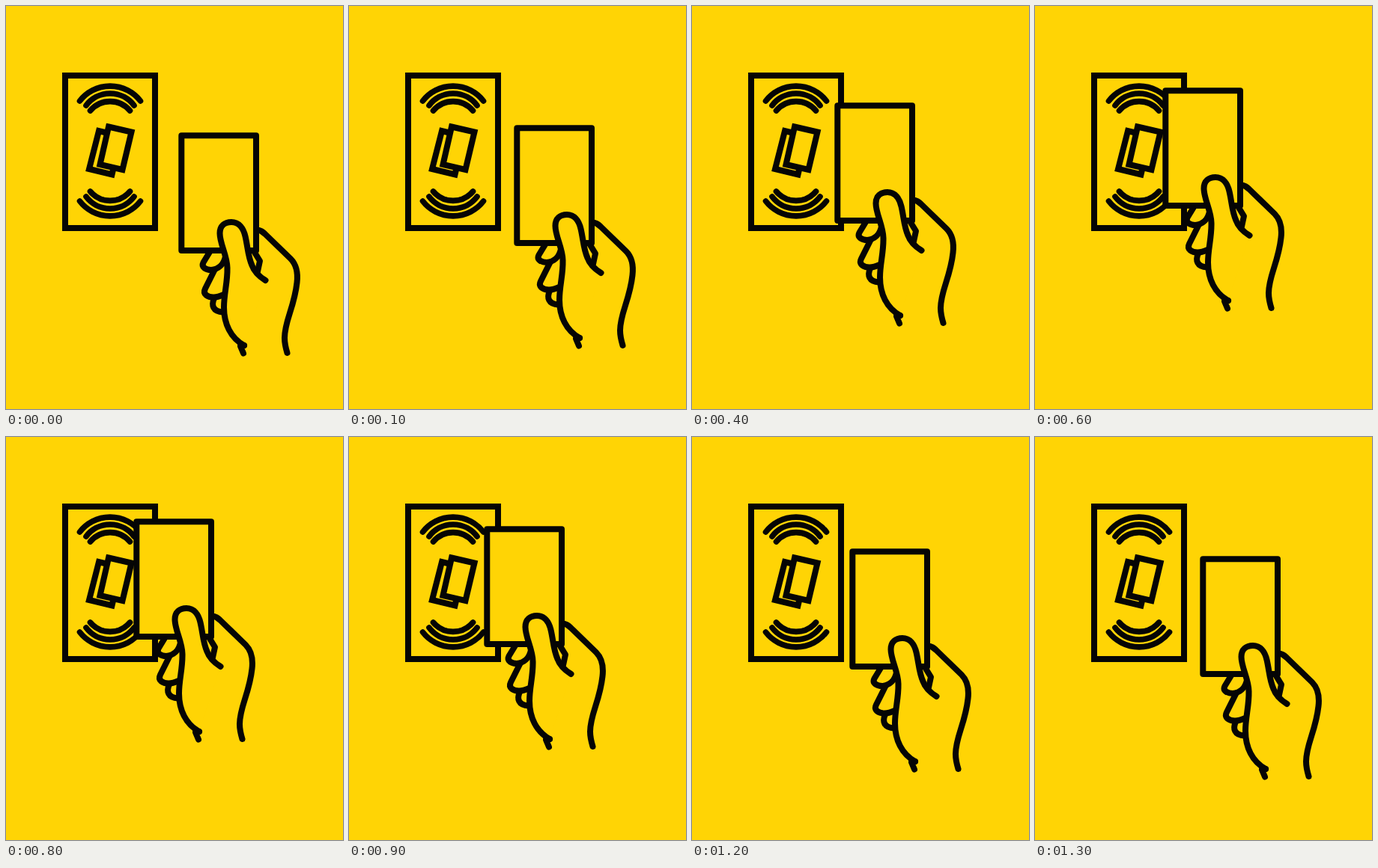
Write an HTML page that moves like this. It is 450 px wide and 539 px high and loops after 1.4 s.

```html
<!DOCTYPE html>
<html lang="en">
<head>
<meta charset="utf-8">
<title>Tap the card</title>
<style>
  html, body { margin: 0; width: 100%; height: 100%; overflow: hidden; background: #ffd405; }
  svg { display: block; width: 100%; height: 100%; }
  .ink { fill: none; stroke: #050505; stroke-width: 8; }
  .round { stroke-linecap: round; stroke-linejoin: round; }
  .solid { fill: #ffd405; }
</style>
</head>
<body>
<svg viewBox="0 0 450 539">
  <!-- reader -->
  <g class="ink">
    <rect x="79" y="93" width="120" height="204"/>
    <g id="waves" class="round" stroke-width="7.6">
      <path d="M98.5 127A51.2 51.2 0 0 1 179.500 127"/>
      <path d="M107 133A40 40 0 0 1 171 133"/>
      <path d="M112.500 140A34.500 34.500 0 0 1 165.500 140"/>
    </g>
    <use href="#waves" transform="matrix(1 0 0 -1 0 388)"/>
    <path d="M136 170L124 167L111 218L141.500 225.500L143.500 217"/>
    <path class="solid" d="M137 161.500L167.500 168.500L155.500 219L125.500 212Z"/>
  </g>

  <!-- hand with card -->
  <g id="hand" class="ink round" stroke-width="8.4">
    <path class="solid" d="M278 391C274 400 276 409 290 409.500"/>
    <path class="solid" d="M279 352L266 378C262 386 270 389.500 277 389.500C284 389.500 288 387 293 385"/>
    <path class="solid" d="M272 329L263.500 343C260 350 268 353 274 353C284 352 291 345 293 335"/>
    <path d="M331 328L339 341L336 355"/>
    <path d="M338 300Q341 300.500 346 305L380 338C388 346 390 357 388.500 370C385 403 372 421 372 444C372 452 374 459 375.500 464"/>
    <rect class="solid" x="234.300" y="173.300" width="99.700" height="153.700"/>
    <path class="solid" d="M318 454C300 444 291 425 291 403C291 384 296 370 295.500 350C295 333 285.500 318 285.500 304C285.500 294 292 289 301 289C311 289 317 297 319.500 308C323 323 323 335 328.500 347C332 357 340 363 346.500 367"/>
    <path d="M318 454L313 455L317 464.500"/>
  </g>
</svg>
<script>
  const LOOP = 1400, TICK = 100, STRIDE = 10;
  const hand = document.getElementById('hand');

  function draw(ms) {
    const step = Math.floor((ms % LOOP) / TICK);
    const shift = -STRIDE * Math.min(step, LOOP / TICK - step);
    hand.setAttribute('transform', `translate(${shift} ${shift})`);
  }

  let start;
  function loop(now) {
    start ??= now;
    draw(now - start);
    requestAnimationFrame(loop);
  }

  draw(0);
  requestAnimationFrame(loop);
</script>
</body>
</html>
```
